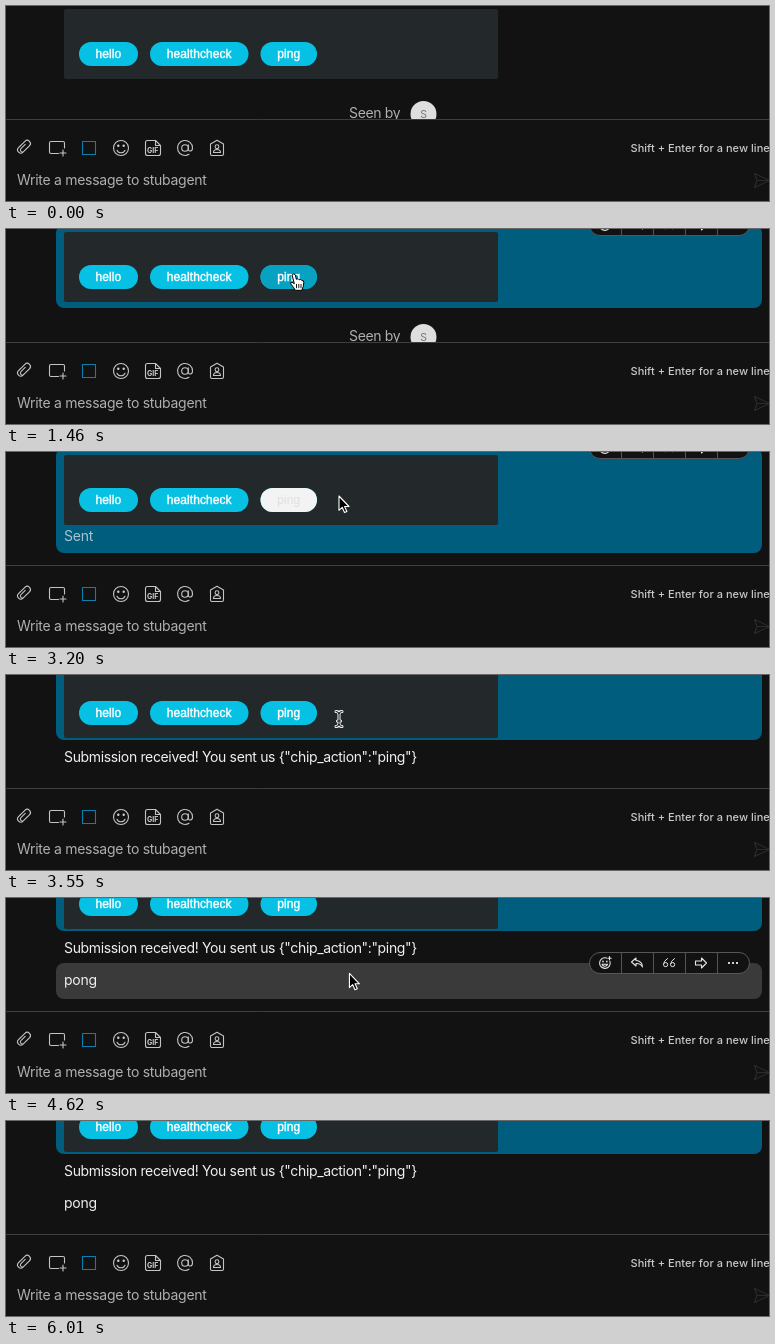
An HTML page for the animation above (7420 ms loop, 763 by 195 pixels).

```html
<!DOCTYPE html>
<html lang="en">
<head>
<meta charset="utf-8">
<title>Chat chips</title>
<style>
  html, body { margin: 0; width: 100%; height: 100%; overflow: hidden; background: #121212; }
  svg { display: block; }
  text { font: 14px Inter, sans-serif; letter-spacing: -.35px; fill: #f0f0f0; }
  .soft { fill: #afafaf; }
  .chip text { font: 12px "Liberation Sans", Arial, sans-serif; letter-spacing: .08px; text-anchor: middle; fill: #fff; stroke: #fff; stroke-width: .4; }
  .off text { fill: #e2dfdc; stroke: none; }
  .icons { fill: none; stroke: #c4c4c4; stroke-width: 1.1; stroke-linecap: round; stroke-linejoin: round; }
  .icons .dot { fill: #d0d0d0; stroke: none; }
</style>
</head>
<body>
<svg width="763" height="195" viewBox="0 0 763 195">
  <rect width="763" height="195" fill="#121212"/>
  <rect id="panel" x="50" width="706" rx="8" fill="#005d7d"/>
  <g id="card">
    <rect x="58" y="3" width="434" height="70" rx="2" fill="#23282b"/>
    <g id="chips"></g>
  </g>
  <rect id="row" x="50" width="706" rx="8" fill="#3a3a3a"/>
  <text id="sent" x="58" y="89" fill-opacity=".7" style="letter-spacing:-.2px">Sent</text>
  <text id="reply" x="58">Submission received! You sent us {"chip_action":"ping"}</text>
  <text id="pong" x="58" y="87" style="letter-spacing:-.25px">pong</text>
  <g id="seen">
    <text class="soft" x="343" y="112">Seen by</text>
    <circle cx="417.5" cy="108" r="13" fill="#dedede"/>
    <text x="417.5" y="112" text-anchor="middle" style="font-size:10.5px;fill:#777">S</text>
  </g>

  <g id="tools" class="icons">
    <rect x="583.5" y=".5" width="160" height="21" rx="10.5" fill="#121212" stroke="#565656" stroke-width="1"/>
    <path stroke="#565656" stroke-width="1" d="M615.5 1v20M647.5 1v20M679.5 1v20M711.5 1v20"/>
    <g stroke="#e6e6e6">
      <path d="M600.5 6a5.300 5.300 0 1 0 3.500 3.600M596 12.300a3 3 0 0 0 5.600 0zM603.500 4.500v3.400M601.800 6.200h3.400"/>
      <path d="M630 6l-4.500 4 4.500 4v-2.500c3-.2 5 .7 6.500 3.500-.2-4-2.500-6.300-6.500-6.500z"/>
      <path stroke-width="1" d="M661.500 6.500q-4 2.500-4 6.300a2.100 2.100 0 1 0 2.100-2.300q-1.300 0-2 1.200M668.500 6.500q-4 2.500-4 6.300a2.100 2.100 0 1 0 2.100-2.300q-1.300 0-2 1.200"/>
      <path d="M695.500 6l5 5-5 5v-3h-6v-4h6z"/>
    </g>
    <circle class="dot" cx="597" cy="9.500" r=".9"/><circle class="dot" cx="600.800" cy="9.500" r=".9"/>
    <path class="dot" d="M722 10h2v2h-2zM726 10h2v2h-2zM730 10h2v2h-2z"/>
  </g>

  <rect y="113" width="763" height="82" fill="#121212"/>
  <path d="M0 113.500H763" stroke="#3e3e3e"/>
  <g class="icons">
    <path transform="rotate(45 18.700 141.700)" d="M16.700 139v6a2 2 0 0 0 4 0v-8a3.200 3.200 0 0 0-6.400 0v7.500M20.700 139v7a3.200 3.200 0 0 1-6.400 0v-3"/>
    <path d="M52.500 147.500h-7.500a1.500 1.500 0 0 1-1.500-1.500v-9a1.500 1.500 0 0 1 1.500-1.500h12a1.500 1.500 0 0 1 1.500 1.500v5M57 144v6M54 147h6"/>
    <rect x="76.500" y="135.500" width="13" height="13" stroke="#0b7fae"/>
    <circle cx="115" cy="142" r="7.500"/>
    <path d="M111 144.200a4.400 4.400 0 0 0 8 0"/>
    <circle class="dot" cx="112.300" cy="139.700" r="1.200"/><circle class="dot" cx="117.700" cy="139.700" r="1.200"/>
    <path d="M149.500 134.500h-8a2 2 0 0 0-2 2v11a2 2 0 0 0 2 2h11a2 2 0 0 0 2-2v-8zM149.500 134.500v5h5"/>
    <text x="141" y="147" style="font-size:7px;font-weight:700;letter-spacing:0;fill:#d0d0d0;stroke:none">GIF</text>
    <circle cx="179" cy="142" r="3.300"/>
    <path d="M182.300 138.700v4.300c0 3 4.200 2.600 4.200-1a7.500 7.500 0 1 0-3.500 6.300"/>
    <path d="M204.500 138l6.500-3.700 6.500 3.700v10a1.500 1.500 0 0 1-1.500 1.500h-10a1.500 1.500 0 0 1-1.500-1.500zM207.500 146.500c0-4 7-4 7 0z"/>
    <circle cx="211" cy="140.700" r="1.900"/>
    <path stroke="#2c2c2c" d="M748.500 167.500l15 7-15 7 2.500-7zM751 174.500h12"/>
  </g>
  <text x="624.500" y="145.500" style="font-size:11px;font-weight:500;letter-spacing:.04px;fill:#c9c9c9">Shift + Enter for a new line</text>
  <text class="soft" x="11" y="179" style="letter-spacing:-.28px">Write a message to stubagent</text>

  <g id="cursor" stroke-linejoin="round" stroke-linecap="round">
    <path id="arrow" d="M0 0v14.300l3.200-3 2.300 5.200 2.400-1-2.300-5h4.400z" fill="#000" stroke="#fff" stroke-width="1.100"/>
    <g id="beam" fill="none">
      <path d="M-3-7.500q3 0 3 2.500 0-2.500 3-2.500M-3 7.500q3 0 3-2.500 0 2.500 3 2.500M0-5v10M-1.500 2h3" stroke="#fff" stroke-width="3"/>
      <path d="M-3-7.500q3 0 3 2.500 0-2.500 3-2.500M-3 7.500q3 0 3-2.500 0 2.500 3 2.500M0-5v10M-1.500 2h3" stroke="#000"/>
    </g>
    <g id="hand" stroke="#000">
      <path d="M-1.500 0q1.500-2 3 0l1 4.500q2-1.500 2.800.5 2-1 2.700.7 2-.5 2 1.800 0 4-2 8h-6.500q-1.500-3-4.500-6.300-.7-2 1.200-1.800l2 1.300z" fill="#fff"/>
      <path d="M2.700 9.500v3.500M5 9.500v3.500M7.200 9.500v3.500" fill="none" stroke-width=".9"/>
    </g>
  </g>
</svg>
<script>
const LOOP = 7420;
const $ = id => document.getElementById(id);
const show = (id, on) => $(id).style.display = on ? '' : 'none';
const set = (id, attrs) => { for (const k in attrs) $(id).setAttribute(k, attrs[k]); };
const between = (t, a, b) => t >= a && t < b;

const chip = (x, w, label, fill, attrs = '') =>
  `<g class="chip" ${attrs}><rect x="${x}" y="36" width="${w}" height="24" rx="12" fill="${fill}"/>` +
  `<text x="${x + w / 2}" y="52">${label}</text></g>`;
$('chips').innerHTML =
  chip(73, 59, 'hello', '#07c1e4') +
  chip(144, 98.5, 'healthcheck', '#07c1e4') +
  chip(254.5, 56.5, 'ping', '#07c1e4') +
  chip(254.5, 56.5, 'ping', '#07a2c2', 'id="hot"') +
  `<g id="off" class="off">${chip(254.5, 56.5, 'ping', '#f3f3f3')}</g>`;

// pointer path: time, x, y
const path = [
  [360, 322, 176], [1080, 287, 45], [1610, 288, 46], [1780, 288, 46], [1810, 289, 46],
  [1960, 289, 46], [2120, 347, 32], [2280, 338, 40], [2480, 82, 74], [2700, 333, 44],
  [4420, 333, 44], [4680, 345, 80], [5070, 345, 80], [5120, 347, 62], [5500, 362, 50],
  [5920, 362, 50], [5985, 362, 172]
];
function pointer(t) {
  const i = path.findIndex(p => p[0] > t);
  if (i < 1) return path[i ? path.length - 1 : 0].slice(1);
  const [a, b] = [path[i - 1], path[i]];
  const u = (t - a[0]) / (b[0] - a[0]), e = u * u * (3 - 2 * u);
  return [a[1] + (b[1] - a[1]) * e, a[2] + (b[2] - a[2]) * e];
}

function draw(t) {
  const [x, y] = pointer(t);
  const onPing = t < 1490 && x > 254 && x < 311 && y > 36 && y < 60;
  const shift = t < 3380 ? 0 : t < 3760 ? -10 : -42;
  const bottom = t < 1490 ? 79 : t < 3380 ? 101 : t < 3760 ? 65 : 33;
  const lit = t >= 360 && (t > 1080 || y < 79);

  show('panel', lit);
  set('panel', { y: shift - 4, height: bottom - shift + 4 });
  set('card', { transform: `translate(0 ${shift})` });
  show('hot', onPing);
  set('off', { opacity: between(t, 1490, 3550) ? Math.min(1, (t - 1460) / 150) : 0 });

  show('seen', t < 1490);
  show('sent', between(t, 1490, 3380));
  show('reply', t >= 3380);
  set('reply', { y: t < 3760 ? 87 : 55 });
  show('pong', t >= 3760);

  const rowOn = between(t, 3940, 5920), last = y >= 65;
  show('row', rowOn);
  set('row', { y: last ? 65 : 33, height: last ? 36 : 32 });
  show('tools', rowOn || lit && t < 3380);
  set('tools', { transform: `translate(0 ${t < 3380 ? -15 : last ? 54 : 22})` });

  const beam = between(t, 1490, 2330) || between(t, 2640, 3200) || between(t, 3380, 4450);
  show('cursor', between(t, 360, 6010));
  set('cursor', { transform: `translate(${x} ${y})` });
  show('hand', onPing);
  show('beam', beam);
  show('arrow', !onPing && !beam);
}

const start = performance.now();
function tick() {
  draw((performance.now() - start) % LOOP);
  requestAnimationFrame(tick);
}
tick();
</script>
</body>
</html>
```
